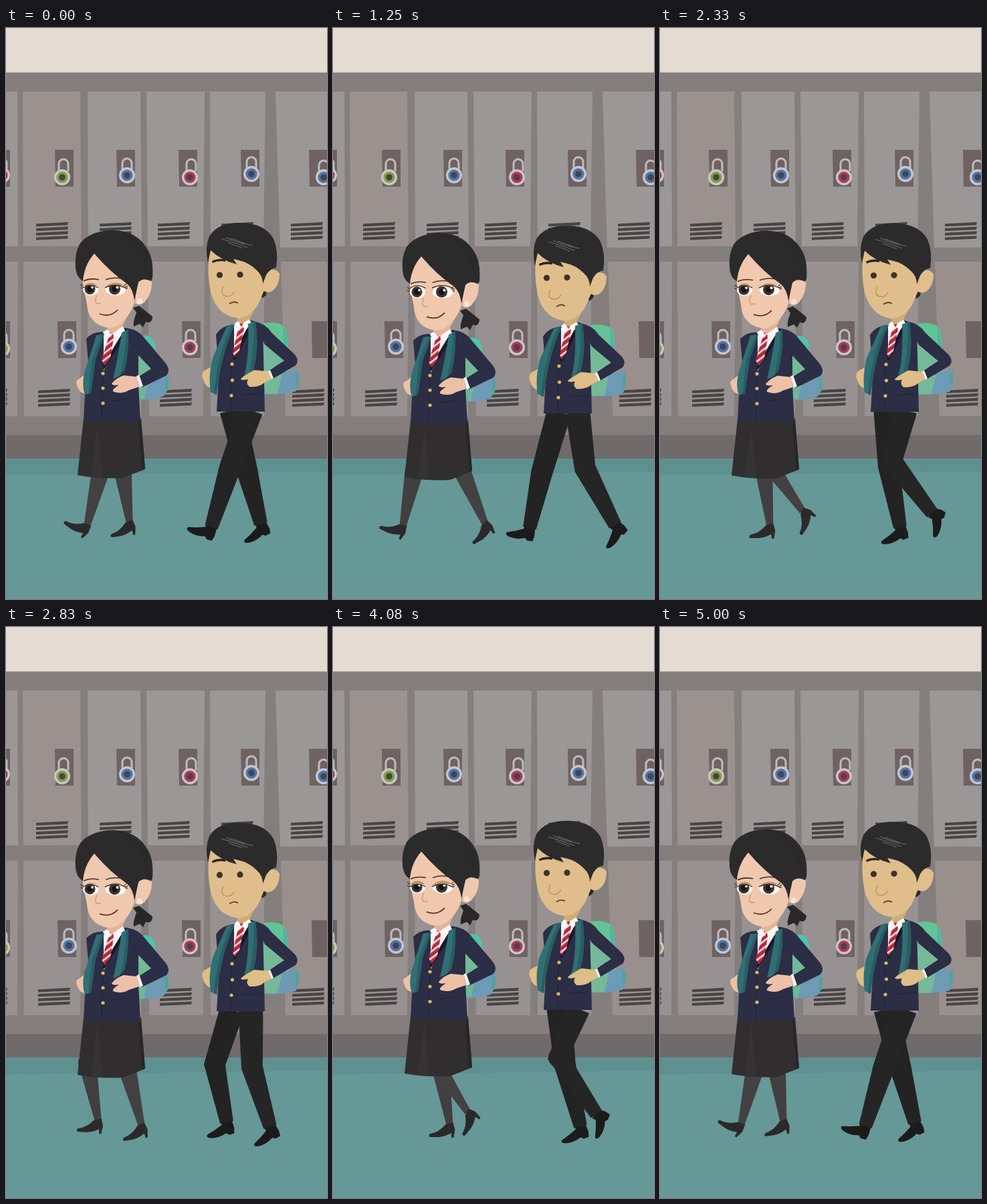
These frames come from a looping animation (480x853 px, 5080 ms). An HTML page:

```html
<!DOCTYPE html>
<html lang="en">
<head>
<meta charset="utf-8">
<title>School corridor walk</title>
<style>
html, body { margin: 0; width: 100%; height: 100%; overflow: hidden; background: #847e7d; }
svg { display: block; width: 100vw; height: 100vh; }
</style>
</head>
<body>
<svg id="stage" viewBox="0 0 480 853" preserveAspectRatio="none">
  <defs>
    <pattern id="stripe" width="8" height="8" patternUnits="userSpaceOnUse" patternTransform="rotate(-38)">
      <rect width="8" height="8" fill="#b9283c"/><rect width="8" height="2.6" fill="#f0e3e3"/>
    </pattern>
    <clipPath id="eyes"><ellipse cx="126.500" cy="390" rx="11.5" ry="9.500"/><ellipse cx="164" cy="390" rx="15.5" ry="9.5"/></clipPath>
  </defs>

  <rect width="480" height="67" fill="#e4dcd2"/>
  <rect y="66.500" width="480" height="542" fill="#847e7d"/>
  <rect y="608" width="480" height="35" fill="#706a6b"/>
  <rect y="643" width="480" height="210" fill="#669897"/>
  <path d="M0 643H480V663L0 668Z" fill="#5f9090"/>
  <g id="lockers"></g>

  <g id="girlLegs"></g>
  <g id="girlBody">
    <path d="M205 460Q220 459 223 474L227 530L196 540Z" fill="#69b596"/>
    <path d="M207 459Q220 460 223 474L224 482Q214 466 205 466Z" fill="#4dc4ae"/>
    <path d="M198 531L242 514Q246 535 236 550Q222 556 200 555Z" fill="#6d9ab5"/>
    <path d="M198 533L212 530L206 555L198 553Z" fill="#70b698"/>
    <path d="M238 522L243 523L242 541L238 546Z" fill="#51a29c"/>
    <path d="M121 515L110 524Q103 526 106 534Q110 546 118 546Z" fill="#edc1a7"/>
    <path d="M116 583L107 668Q140 674 175 672L208 659L202 583Z" fill="#302e2f"/>
    <path d="M137 590L127 670L144 672Z" fill="#353334"/>
    <path d="M198 588L204 661L208 658L202 587Z" fill="#282728"/>
    <path d="M120 464Q130 453 145 454L180 448Q196 451 203 461L204 500L198 532L201 588L116 587L118 548L124 510Z" fill="#2b2e45"/>
    <path d="M183 449Q198 451 206 462L238 500Q247 511 240 519L203 537L196 521L216 509L196 490Z" fill="#2b2e45"/>
    <path d="M198 489L217 509L198 521Z" fill="#74b998"/>
    <path d="M195 520L199 518L205 535L200 537Z" fill="#f1eff0"/>
    <path d="M196 521L176 519Q166 522 158 531Q159 535 169 533Q158 540 160 543Q173 548 184 541L199 536Z" fill="#edc1a7"/>
    <path d="M146 455L152 450L172 443L177 455L146 512Z" fill="#f0eef0"/>
    <path d="M178 449L182 453L148 508L146 510L145 504Z" fill="#191a28"/>
    <path d="M153 455L160 454L161 463L156 493L148 504L143 496L153 463Z" fill="url(#stripe)"/>
    <path d="M145 454L152 450L158 460L149 466ZM160 457L174 445L178 452L167 465Z" fill="#f7f5f6"/>
    <path d="M135 459L147 457L134 495L127 545L118 548Q113 535 117 516Z" fill="#307074"/>
    <path d="M143 458L147 457L134 495L127 545L123 547L129 495Z" fill="#2a5d63"/>
    <path d="M173 455L183 450Q184 485 177 512L168 521L160 524Q167 495 173 455Z" fill="#307074"/>
    <path d="M180 452L183 450Q184 485 177 512L171 518Q179 485 180 452Z" fill="#2a5d63"/>
    <path d="M157 557L187 553M145 511L143 587" stroke="#202338" fill="none"/>
    <g fill="#ddb65f"><circle cx="145" cy="516" r="2.6"/><circle cx="145" cy="538" r="2.6"/><circle cx="145" cy="560.500" r="2.6"/></g>
  </g>
  <g id="girlHead">
    <path d="M152 440L190 412L174 446L160 456L151 451Z" fill="#e4b498"/>
    <path d="M190 418L199 415L219 431Q219 438 214 440L209 439L205 447L200 442L191 446Q190 440 192 434L195 425Z" fill="#292829"/>
    <path d="M196 380Q213 370 218 379Q219 396 207 410Q200 416 193 411Z" fill="#f0c8ad"/>
    <path d="M120 340L114 376L118 398L121 412Q122 431 135 441Q151 451 164 446Q183 436 192 411L197 370L180 340L140 328Z" fill="#f0c8ad"/>
    <path d="M104 358Q102 338 110 323C120 309 139 302 161 302Q197 303 213 333Q221 348 219 374L217 378Q204 372 198 380L192 407Q190 390 181 382Q156 365 132 337Q117 354 115 378Q105 372 104 358Z" fill="#2c2b2c"/>
    <path d="M174 305Q203 322 208 352Q211 364 218 372M181 309Q203 323 214 344" fill="none" stroke="#262526"/>
    <circle cx="200" cy="408" r="4" fill="#f5e6d8"/>
    <path d="M116 378Q126 373 139 376M149 376Q162 371 175 375" fill="none" stroke="#43312c" stroke-width="1.500"/>
    <path d="M114 387Q126 376 138 386ZM147 388Q163 374 180 387Z" fill="#cba580"/>
    <g clip-path="url(#eyes)">
      <rect x="108" y="376" width="80" height="28" fill="#faf7f5"/>
      <g fill="#3a3634"><circle cx="125.500" cy="390" r="8"/><circle cx="162.500" cy="390" r="8.500"/></g>
      <g fill="#171515"><circle cx="125.500" cy="390" r="4.500"/><circle cx="162.500" cy="390" r="4.500"/></g>
      <g fill="#fff"><circle cx="129" cy="387.500" r="1.800"/><circle cx="166.500" cy="387.500" r="2"/></g>
      <path id="lids" fill="#bd9269"/>
    </g>
    <path id="lashes" fill="none" stroke="#3a2a25" stroke-width="1.300"/>
    <path d="M115 386L111 383M115 389L111 388M178 388L182 385M179 390L182 388M176 386L180 382" stroke="#583a2d" stroke-width="1.200"/>
    <path d="M136 399Q131 410 137 412L142 411" fill="none" stroke="#d19c80" stroke-width="1.500"/>
    <path d="M140 427Q156 433 167 421" fill="none" stroke="#692d30" stroke-width="1.800"/>
  </g>

  <g id="boyLegs"></g>
  <g id="boyBody">
    <path d="M382 443Q411 436 419 451Q424 480 424 530L387 546Z" fill="#75b999"/>
    <path d="M385 441Q411 437 419 451L422 485Q413 459 385 449Z" fill="#62c494"/>
    <path d="M414 446Q419 450 420 462L423 495L416 492Z" fill="#49b9a2"/>
    <path d="M386 522L436 509Q441 532 433 543Q415 548 387 547Z" fill="#6d9ab5"/>
    <path d="M386 520L409 511L412 520L406 546L387 547Z" fill="#75b999"/>
    <path d="M433 515L438 514L438 529L434 536Z" fill="#51a29c"/>
    <path d="M309 505L296 512Q291 518 295 525Q297 535 306 538Z" fill="#dfbd87"/>
    <path d="M314 458Q322 445 340 443L364 436Q375 438 384 447L387 573L315 573L318 520L316 485Z" fill="#2b2e45"/>
    <path d="M370 438Q388 441 397 455L432 488Q439 497 433 504L399 524L392 513L415 497L387 473Z" fill="#2b2e45"/>
    <path d="M387 473L416 497L392 512L387 514Z" fill="#75b999"/>
    <path d="M391 513L395 511L400 523L397 525Z" fill="#f1eff0"/>
    <path d="M392 513L372 511Q363 513 351 524Q352 527 362 525Q358 531 364 536Q379 537 386 530L397 524Z" fill="#dfbd87"/>
    <path d="M341 443L347 437L362 432L366 440L341 497Z" fill="#f0eef0"/>
    <path d="M366 438L369 443L343 495L340 497L340 487Z" fill="#191a28"/>
    <path d="M347 442L354 440L356 449L349 482L342 492L339 485L347 450Z" fill="url(#stripe)"/>
    <path d="M340 444L347 437L352 447L344 455ZM353 444L363 434L367 440L358 452Z" fill="#f7f5f6"/>
    <path d="M330 446L342 443Q321 488 315 548L306 544Q302 520 309 493Z" fill="#307074"/>
    <path d="M337 445L342 443Q321 488 315 548L311 546Q316 487 337 445Z" fill="#2a5d63"/>
    <path d="M362 442L373 438Q379 477 370 511L356 520Q364 492 362 442Z" fill="#307074"/>
    <path d="M370 441L373 438Q379 477 370 511L364 515Q372 480 370 441Z" fill="#2a5d63"/>
    <path d="M353 548L383 546M337 496L336 573" stroke="#202338" fill="none"/>
    <g fill="#ddb65f"><circle cx="338" cy="502" r="2.6"/><circle cx="338.500" cy="526" r="2.6"/><circle cx="337" cy="549" r="2.6"/></g>
  </g>
  <g id="boyHead">
    <path d="M345 425L380 405L364 435L352 442L346 438Z" fill="#cfac74"/>
    <path d="M380 390L390 391L389 399L383 404Z" fill="#2c2b2c"/>
    <path d="M386 364Q402 356 409 367Q409 385 398 393Q391 397 384 392Z" fill="#e0bf8d"/>
    <path d="M304 335Q300 366 306 394Q310 412 323 424Q337 434 350 433Q366 430 377 413L386 392L395 350L370 325L312 325Z" fill="#dfbe8c"/>
    <path d="M302 351Q297 328 304 311Q317 290 352 291Q387 292 400 315Q408 334 404 358Q395 359 389 369L384 382Q384 370 375 362Q363 350 348 347L340 345L345 353Q321 347 306 332Z" fill="#2c2b2c"/>
    <path d="M322 315Q340 320 361 328M329 313Q345 321 369 325M336 314L358 322M333 321L354 329" fill="none" stroke="#686666" stroke-width="1.100"/>
    <path d="M308 348Q317 343 328 346L328 349Q317 347 309 351Z" fill="#282425"/>
    <g fill="#3c332d"><circle cx="319.500" cy="369" r="4.600"/><circle cx="350" cy="368.500" r="4.600"/></g>
    <path d="M325 386Q320 397 327 400Q336 403 341 394" fill="none" stroke="#b99660" stroke-width="1.500"/>
    <path d="M334 412Q341 407 347 411" fill="none" stroke="#66422d" stroke-width="1.800"/>
  </g>
</svg>
<script>
const el = id => document.getElementById(id);
const poly = (pts, fill) => `<path d="M${pts.map(p => p.map(n => n.toFixed(1)).join(' ')).join('L')}Z" fill="${fill}"/>`;

// ---- lockers
function door(x1, x2, y1, y2, x3, x4, fill = '#9c9797') {
  return poly([[x1, y1], [x2, y1], [x4, y2], [x3, y2]], fill);
}
function plate(x, y) {
  return poly([[x, y], [x + 28, y], [x + 28, y + 55], [x + 1, y + 55]], '#6e6362');
}
function lock(x, y, color, lean = 0) {
  const l = x - 7 + lean, r = x + 7 + lean, top = y - 25 - lean;
  return `<path d="M${l} ${y - 9}V${top + 7}A7 7 0 0 1 ${r} ${top + 7}V${y - 9}" fill="none" stroke="#bfbbbc" stroke-width="3"/>
    <circle cx="${x}" cy="${y}" r="12" fill="#c9c6c8"/><circle cx="${x}" cy="${y}" r="8.6" fill="${color}"/><circle cx="${x}" cy="${y}" r="4.8" fill="#494448"/>`;
}
function vent(x, y) {
  let s = '';
  for (let i = 0; i < 4; i++) {
    const b = y + i * 6.8;
    s += poly([[x, b + 2.4], [x + 48, b], [x + 47, b + 4.4], [x, b + 6.4]], '#484444');
  }
  return s;
}
const green = '#81a13d', blue = '#4b76b5', pink = '#b23760', tan = '#9b918e', low = '#979191';
el('lockers').innerHTML =
  door(-9, 17, 95, 326, -9, 18) + door(25, 111, 95, 326, 26, 113, tan) + door(122, 201, 95, 326, 123, 203) +
  door(210, 297, 95, 326, 212, 295) + door(305, 388, 95, 328, 306, 385) + door(403, 489, 95, 328, 410, 489) +
  door(-9, 18, 349, 580, -9, 17, low) + door(26, 113, 349, 580, 27, 111, low) + door(122, 203, 349, 580, 123, 202, low) +
  door(212, 297, 349, 580, 214, 295, low) + door(305, 386, 349, 580, 306, 386, low) + door(411, 489, 349, 580, 418, 489, '#998f8c') +
  [-22, 73, 165, 258, 351, 453].map(x => plate(x, 182)).join('') +
  [-22, 77, 263, 457].map(x => plate(x, 438)).join('') +
  lock(-6, 220, pink) + lock(84, 223, green, 2) + lock(181, 220, blue) + lock(275, 223, pink, 2) +
  lock(367, 218, blue) + lock(475, 223, blue) + lock(-6, 479, green) + lock(94, 476, blue) + lock(275, 477, pink, 1) +
  [45, 140, 227, 322, 426].map(x => vent(x, 290)).join('') +
  [-46, 48, 230, 428].map(x => vent(x, 539)).join('');

// ---- walk cycle: knee x, knee y, ankle x, ankle y, shoe angle
const far = [
  [360, 660, 381, 741, -20], [358, 655, 391, 742, -35], [345, 655, 396, 735, -60], [325, 650, 380, 728, -55], [312, 654, 330, 740, -8],
  [312, 665, 294, 747, 14], [318, 658, 314, 750, 0], [330, 655, 337, 748, -8], [342, 655, 359, 746, -12], [347, 655, 370, 746, -12]];
const near = [
  [334, 660, 307, 746, 25], [330, 660, 313, 748, 6], [343, 660, 340, 750, -5], [355, 658, 366, 748, -10], [368, 658, 395, 747, -22],
  [377, 658, 422, 743, -42], [374, 658, 425, 738, -62], [360, 653, 417, 730, -70], [348, 648, 407, 725, -68], [337, 643, 394, 728, -62]];
const bob = [0, 2.8, 3.4, 1.8, 1.4, 4.3, 4.2, 2.6, 0.8, -1.4];

const boyShoe = 'M-8 -3L8 -3L10 10L9 18L1 19L-3 16Q-15 22 -27 20Q-35 18 -31 14Q-20 10 -8 3Z';
const girlShoe = 'M-6 0L5 -3L8 8L6 20L3 20L2 13Q-6 18 -16 19L-29 19Q-33 17 -29 14Q-16 12 -6 0Z';

function normal(a, b, w) {
  const dx = b[0] - a[0], dy = b[1] - a[1], d = Math.hypot(dx, dy) || 1;
  return [-dy / d * w / 2, dx / d * w / 2];
}
function leg(hip, knee, ankle, widths, fill) {
  const n = [normal(hip, knee, widths[0]), normal(hip, ankle, widths[1]), normal(knee, ankle, widths[2])];
  const joints = [hip, knee, ankle];
  const side = s => joints.map((p, i) => [p[0] + s * n[i][0], p[1] + s * n[i][1]]);
  return poly([...side(1), ...side(-1).reverse()], fill) +
    `<circle cx="${knee[0]}" cy="${knee[1]}" r="${widths[1] / 2 - 1}" fill="${fill}"/>`;
}
function shoe(shape, ankle, angle, fill) {
  return `<path d="${shape}" transform="translate(${ankle}) rotate(${angle})" fill="${fill}"/>`;
}
function boyLeg([kx, ky, ax, ay, turn], hipX, drop, fill) {
  return shoe(boyShoe, [ax, ay], turn, '#1c1b1c') +
    leg([hipX, 571 + drop], [kx, ky], [ax, ay], [37, 32, 20], fill);
}
function girlLeg([kx, ky, ax, ay, turn], hipX, kneeX, ankleX, fill) {
  const knee = [kneeX + (kx - 338) * 1.1, ky - 3];
  const ankle = [ankleX + (ax - 338) * 0.92, ay - 3];
  return leg([hipX, 590], knee, ankle, [34, 28, 10], fill) +
    shoe(girlShoe, ankle, turn + 12, '#2c292b');
}

function draw(step) {
  const i = step % 10, head = bob[i], body = head * 0.7;
  el('boyLegs').innerHTML = boyLeg(far[i], 338, body, '#242324') + boyLeg(near[i], 366, body, '#262526');
  el('girlLegs').innerHTML = girlLeg(far[i], 146, 150, 145, '#413f40') + girlLeg(near[i], 176, 147, 150, '#434142');
  for (const who of ['girl', 'boy']) {
    el(who + 'Body').setAttribute('transform', `translate(0 ${body})`);
    el(who + 'Head').setAttribute('transform', `translate(0 ${head})`);
  }
  const lid = 386 - head * 0.9;
  el('lids').setAttribute('d', `M108 370H188V${lid}Q164 ${lid - 4} 146 ${lid + 1}L139 ${lid}Q126 ${lid - 4} 108 ${lid + 1}Z`);
  el('lashes').setAttribute('d', `M115 ${lid + 2}Q126 ${lid - 5} 138 ${lid + 2}M148 ${lid + 2}Q164 ${lid - 6} 180 ${lid + 3}`);
}

const LOOP = 5080;
let start = null, shown = -1;
function tick(now) {
  if (start === null) start = now;
  const t = (now - start) % LOOP;
  const step = Math.min(60, Math.floor((t + 5) * 0.012));
  if (step !== shown) draw(shown = step);
  requestAnimationFrame(tick);
}
draw(0);
requestAnimationFrame(tick);
</script>
</body>
</html>
```
